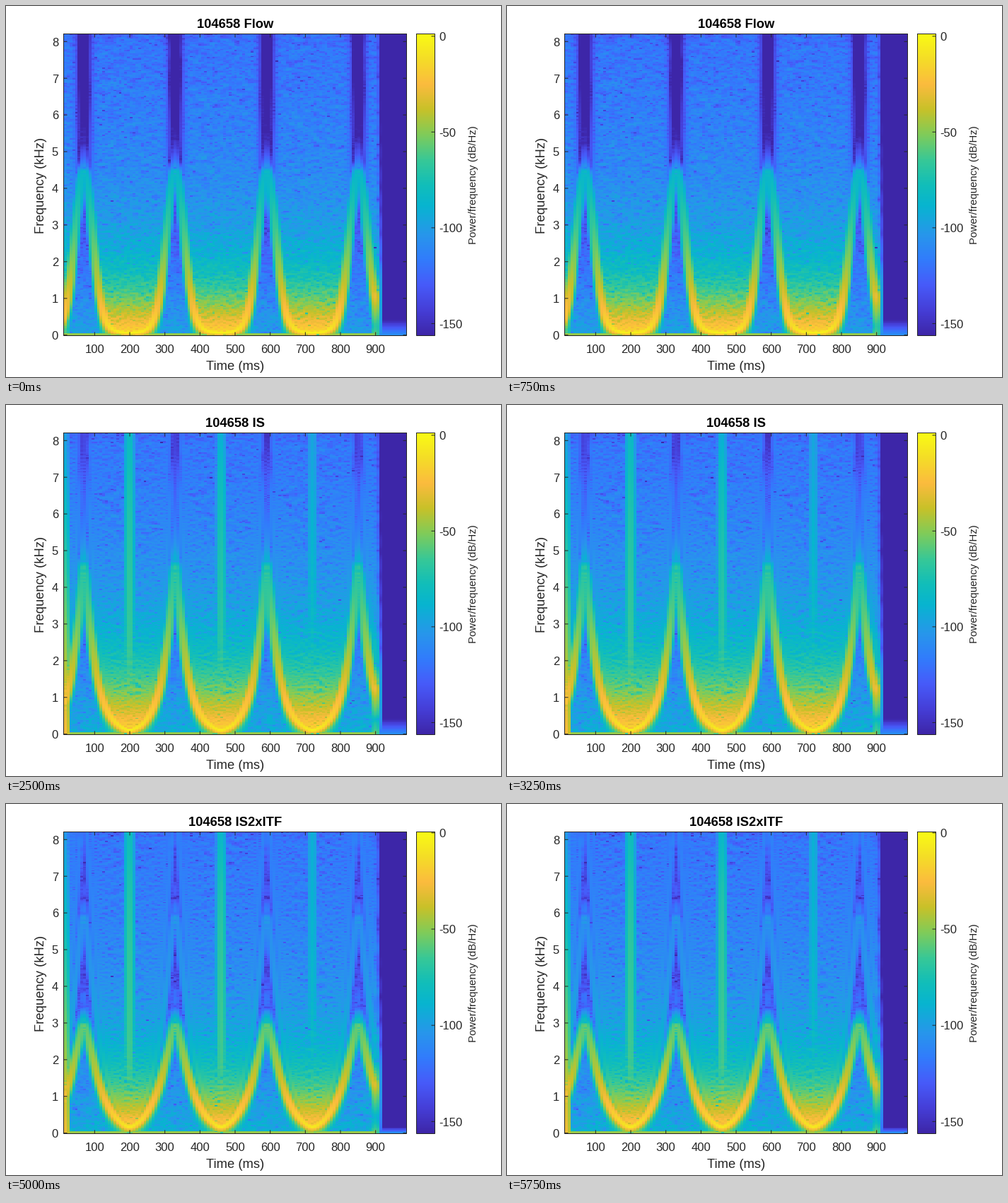
Write a matplotlib script that moves like this. It is 700x525 px and loops after 6.25 s.

```python
import numpy as np
import matplotlib.pyplot as plt
from matplotlib.animation import FuncAnimation
from matplotlib.colors import LinearSegmentedColormap

W, H, DPI = 700, 525, 100
L, R, T, B = 81.5, 566.5, 39.5, 466.5      # spectrogram box
CL, CR = 580.5, 606.5                      # colour bar
INK = "#262626"

FS, WIN, HOP = 16384, 512, 128
NYQUIST = FS / 2000                        # kHz
PERIOD, PEAK = 260.5, 68.2                 # ms
LIVE = 115                                 # columns that hold signal

plt.rcParams["font.family"] = "Liberation Sans"
plt.rcParams["axes.unicode_minus"] = False

PARULA = LinearSegmentedColormap.from_list("parula", [
    (0, (.242, .150, .660)), (.083, (.272, .245, .845)),
    (1 / 6, (.278, .356, .978)), (.25, (.196, .485, .989)),
    (1 / 3, (.154, .590, .922)), (.43, (.030, .708, .816)),
    (.5, (.070, .746, .726)), (.58, (.216, .784, .592)),
    (2 / 3, (.504, .799, .348)), (.75, (.786, .757, .160)),
    (5 / 6, (.987, .735, .244)), (.92, (.960, .870, .150)),
    (1, (.977, .984, .081))], N=256)

time = np.arange(FS) / FS * 1000           # ms
dist = np.abs((time - PEAK + PERIOD / 2) % PERIOD - PERIOD / 2)
soft = np.sqrt(dist ** 2 + 16) - 4         # distance with a rounded tip
envelope = np.cos(np.pi / 2 * np.clip((time - 898) / 2, 0, 1)) ** 2

# Instantaneous frequency in kHz
bell = 4.45 * np.exp(-5.2 * np.sin(np.pi * dist / PERIOD) ** 2) + .03
cusp = 4.6 * np.exp(-soft / 32)
low = 2.95 * np.exp(-(soft / 50) ** 1.2)


def power(db):
    return 10 ** (db / 10)


def overtone_density(f, reach):
    """Power per Hz of the upper harmonics at f kHz."""
    fall = 1 - np.exp(-(f / reach) ** 1.2)
    return power(-12 - 88 * fall - 2.2 * f)


def shaped(spectrum, density):
    """Colour a flat spectrum with a power density given in dB."""
    f = np.fft.rfftfreq(FS, 1 / FS) / 1000
    return np.fft.irfft(spectrum * np.sqrt(power(density(f))), FS)


def synth(f, loss, reach, gap, floor, click, rng):
    phase = 2 * np.pi * np.cumsum(f) * 1000 / FS
    rate = np.gradient(f) * 1000 * FS      # Hz per second
    width = np.hypot(48, rate * .0117)     # band the sweep fills in one window
    signal = np.sqrt(2 * power(-loss * f ** .7) * width) * np.cos(phase)

    gate = 1 / (1 + (gap / np.maximum(dist, .1)) ** 10)
    for k in range(2, int(NYQUIST / f.min()) + 1):
        on = k * f < NYQUIST
        amp = np.sqrt(2 * overtone_density(k * f[on], reach) * f[on] * 1000)
        signal[on] += gate[on] * amp * np.cos(k * phase[on] + rng.uniform(0, 2 * np.pi))

    noise = np.fft.rfft(rng.normal(size=FS)) * np.sqrt(FS / 2)
    signal += shaped(noise, lambda q: floor - 11 * q)
    level, slope = click
    impulse = np.fft.rfft(np.arange(FS) == int(.013 * FS)) * np.sqrt(FS * 96)
    signal += shaped(impulse, lambda q: level - slope * q)
    return (signal + .03) * envelope


def spectrogram(signal, glow):
    window = .5 - .5 * np.cos(2 * np.pi * np.arange(WIN) / WIN)
    starts = np.arange(0, FS - WIN + 1, HOP)
    parts = signal[starts[:, None] + np.arange(WIN)] * window
    psd = 2 * np.abs(np.fft.rfft(parts)) ** 2 / (FS * (window ** 2).sum())
    psd[:, 0] /= 2
    db = 10 * np.log10(psd.T + 1e-16)
    f = np.linspace(0, NYQUIST, len(db))[:, None]
    db[:, LIVE:] = np.maximum(db[:, LIVE:], -108 - 48 * f / glow)
    return db


# name, sweep, ridge loss, overtone reach, gap (ms), floor, click, glow, top
VIEWS = [
    ("Flow", bell, 30, 1.50, 31, -98, (-60, 12), .40, 1.2),
    ("GT", cusp, 30, 1.60, 17, -96, (-25, 14), .15, 1.2),
    ("IS", cusp, 25, 1.90, 13, -90, (-25, 9), .40, 1.2),
    ("IS2", cusp, 29, 1.55, 20, -97, (-55, 12), .40, 1.2),
    ("IS2xITF", low, 28, 1.60, 1, -90, (-28, 9), .15, .5),
]


def x_of(t):
    return L + (t - 11.72) * (R - L) / 976.56


def y_of(f):
    return B - (f + .016) / 8.224 * (B - T)


def y_of_db(db, top):
    return T + (top - db) / (top + 156.3) * (B - T)


fig = plt.figure(figsize=(W / DPI, H / DPI), dpi=DPI, facecolor="white")
ax = fig.add_axes([0, 0, 1, 1])


def line(xs, ys):
    return ax.plot(xs, ys, color=INK, lw=.72, solid_capstyle="butt",
                   solid_joinstyle="miter", snap=False, zorder=3)[0]


def box(l, r):
    line([l, r, r, l, l], [T, T, B, B, T])


def label(x, y, s, size, **kw):
    kw = dict(dict(ha="center", va="baseline", color=INK), **kw)
    return ax.text(x, y, s, fontsize=size, **kw)


def picture(data, l, r):
    return ax.imshow(data, cmap=PARULA, origin="lower", extent=(l, r, B, T),
                     aspect="auto", interpolation="nearest")


image = picture(np.zeros((WIN // 2 + 1, 125)), L, R)
picture(np.arange(256)[:, None], CL, CR)
ax.set_xlim(0, W)
ax.set_ylim(H, 0)
ax.axis("off")
box(L, R)
box(CL, CR)

for t in range(100, 1000, 100):
    x = x_of(t)
    line([x, x], [B, B - 5])
    line([x, x], [T, T + 5])
    label(x, 491, str(t), 12)
for f in range(9):
    y = y_of(f)
    line([L, L + 5], [y, y])
    line([R, R - 5], [y, y])
    label(74, y + 6.3, str(f), 12, ha="right")

label(324, 515, "Time (ms)", 13.2)
upright = dict(rotation=90, rotation_mode="anchor")
label(54, 253.5, "Frequency (kHz)", 13.2, **upright)
label(665, 253, "Power/frequency (dB/Hz)", 10.8, **upright)
title = label(324, 31, "", 13.2, color="black", weight="bold")

scale = [(db, line([CR - 5, CR], [0, 0]), label(612.5, 0, str(db), 12, ha="left"))
         for db in range(0, -151, -50)]

frames = []
for i, (name, *voice, glow, top) in enumerate(VIEWS):
    signal = synth(*voice, np.random.default_rng(11 + i))
    frames.append((name, spectrogram(signal, glow), top))


def draw(i):
    name, data, top = frames[i]
    image.set_data(data)
    image.set_clim(-156.3, top)
    title.set_text("104658 " + name)
    for db, tick, text in scale:
        y = y_of_db(db, top)
        tick.set_ydata([y, y])
        text.set_y(y + 6.3)
    return []


anim = FuncAnimation(fig, draw, frames=len(frames), interval=1250,
                     repeat=True, repeat_delay=0, blit=False)
plt.show()
```
